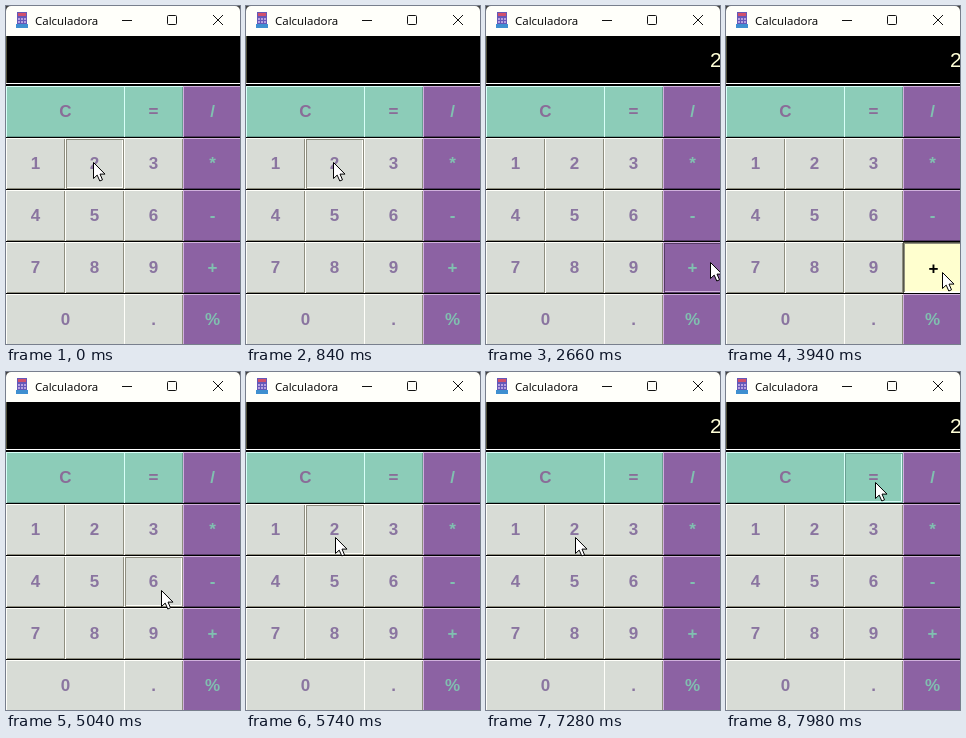
These frames come from a looping animation (234 px wide and 338 px high, 8000 ms). An HTML page with a canvas:

```html
<!DOCTYPE html>
<html lang="es">
<head>
<meta charset="utf-8">
<title>Calculadora</title>
<style>
  html, body { margin: 0; width: 234px; height: 338px; overflow: hidden; }
  canvas { display: block; }
</style>
</head>
<body>
<canvas width="234" height="338"></canvas>
<script>
const ctx = document.querySelector('canvas').getContext('2d');
const LOOP = 8000, COL = 59, ROW = 52, TOP = 80;
const SANS = '"Liberation Sans", Arial, sans-serif';

const themes = {
  key: { fill: '#d8dcd6', text: '#8a75a0', light: '#fffffa', dark: '#8e8e80' },
  green: { fill: '#8cccb8', text: '#8a6c98', light: '#d8fff8', dark: '#6a9f92' },
  op: { fill: '#8c62a3', text: '#80c0b0', light: '#d0b0dc', dark: '#553a66' },
};

// A repeated label in a row is one wide button, slightly overlapped by its neighbour.
const buttons = ['CC=/', '123*', '456-', '789+', '00.%'].flatMap((row, r) =>
  [...new Set(row)].map(label => {
    const col = row.indexOf(label);
    const span = row.lastIndexOf(label) - col + 1;
    const theme = col === 3 ? themes.op : r === 0 ? themes.green : themes.key;
    return { label, theme, x: col * COL, y: TOP + r * ROW, w: span * COL + span - 1, h: ROW - 1 };
  }));

const home = { x: 87, y: 156 };
const moves = [
  { start: 1800, end: 2640, x: 224, y: 256 },
  { start: 2800, end: 3600, x: 216, y: 266 },
  { start: 4900, end: 5620, x: 89, y: 165 },
  { start: 7280, end: 7980, x: 149, y: 110 },
];

const clicks = [
  { label: '2', down: 1440, up: 1560, shows: '2' },
  { label: '+', down: 3940, up: 4060, shows: '' },
  { label: '2', down: 6440, up: 6560, shows: '2' },
];

function rect(color, x, y, w, h) {
  ctx.fillStyle = color;
  ctx.fillRect(x, y, w, h);
}

function text(str, x, y, font, color, align = 'left') {
  ctx.font = font;
  ctx.fillStyle = color;
  ctx.textAlign = align;
  ctx.fillText(str, x, y);
}

function bevel({ x, y, w, h }, inset, topLeft, bottomRight) {
  x += inset; y += inset; w -= 2 * inset; h -= 2 * inset;
  rect(bottomRight, x, y + h - 1, w, 1);
  rect(bottomRight, x + w - 1, y, 1, h);
  rect(topLeft, x, y, w, 1);
  rect(topLeft, x, y, 1, h);
}

// Every move starts fast and settles slowly.
function pointerAt(t) {
  let { x, y } = home;
  for (const m of moves) {
    const u = Math.min(1, Math.max(0, (t - m.start) / (m.end - m.start)));
    const eased = 1 - (1 - u) ** 3;
    x += (m.x - x) * eased;
    y += (m.y - y) * eased;
  }
  return { x: Math.round(x), y: Math.round(y) };
}

function drawTitleBar() {
  rect('#444', 0, 0, 234, 30);
  ctx.fillStyle = '#fffffa';
  ctx.beginPath();
  ctx.roundRect(0, 0, 234, 31, [5, 5, 0, 0]);
  ctx.fill();

  rect('#6558b8', 11, 6, 10, 12);
  rect('#d0506c', 12, 7, 8, 3);
  rect('#3f8fd0', 10, 18, 12, 4);
  for (let i = 0; i < 6; i++) rect('#b8a0e0', 12 + i % 3 * 3, 12 + Math.floor(i / 3) * 3, 2, 2);
  text('Calculadora', 29, 19, '11.5px "Open Sans", "Noto Sans", sans-serif', '#000');

  ctx.strokeStyle = '#111';
  ctx.lineWidth = 1;
  ctx.beginPath();
  ctx.moveTo(116, 14.5); ctx.lineTo(126, 14.5);
  ctx.roundRect(161.5, 9.5, 9, 9, 1);
  ctx.moveTo(207, 9); ctx.lineTo(217, 19);
  ctx.moveTo(217, 9); ctx.lineTo(207, 19);
  ctx.stroke();
}

function drawDisplay(value) {
  rect('#000', 0, 30, 234, 308);
  rect('#50503a', 0, 30, 1, 48);
  rect('#fff', 0, 77, 234, 1);
  text(value, 224, 61, `21px ${SANS}`, '#ffffd8');
}

function drawButton(button, state) {
  const { label, theme, x, y, w, h } = button;
  const pressed = state === 'pressed';
  rect(pressed ? '#ffffcf' : theme.fill, x, y, w, h);
  if (pressed) {
    bevel(button, 0, '#55554a', '#fff');
    bevel(button, 1, '#8e8e7c', '#fffff2');
  } else {
    bevel(button, 0, theme.light, theme.dark);
    if (state === 'hover') bevel(button, 1, theme.dark, theme.light);
  }
  const shift = pressed ? 1 : 0;
  text(label, x + w / 2 + shift, y + 31 + shift, `bold 17px ${SANS}`, pressed ? '#000' : theme.text, 'center');
}

function drawPointer({ x, y }) {
  const outline = [[0, 0], [0, 16], [3.7, 12.6], [6.3, 18.5], [9, 17.3], [6.5, 11.6], [11.5, 11.6]];
  ctx.beginPath();
  for (const [dx, dy] of outline) ctx.lineTo(x + dx + .5, y + dy + .5);
  ctx.closePath();
  ctx.fillStyle = '#fff';
  ctx.fill();
  ctx.strokeStyle = '#000';
  ctx.stroke();
}

function draw() {
  const t = performance.now() % LOOP;
  const pointer = pointerAt(t);
  const over = buttons.findLast(b =>
    pointer.x >= b.x && pointer.x < b.x + b.w && pointer.y >= b.y && pointer.y < b.y + ROW);
  const pressing = clicks.some(c => t >= c.down && t < c.up);
  const last = clicks.findLast(c => t >= c.up);

  drawTitleBar();
  drawDisplay(last ? last.shows : '');

  // A clicked button stays raised until the pointer leaves it.
  for (const b of buttons) {
    const state = b !== over ? 'raised' : pressing ? 'pressed' : last?.label === b.label ? 'raised' : 'hover';
    drawButton(b, state);
  }
  drawPointer(pointer);
  requestAnimationFrame(draw);
}
draw();
</script>
</body>
</html>
```
